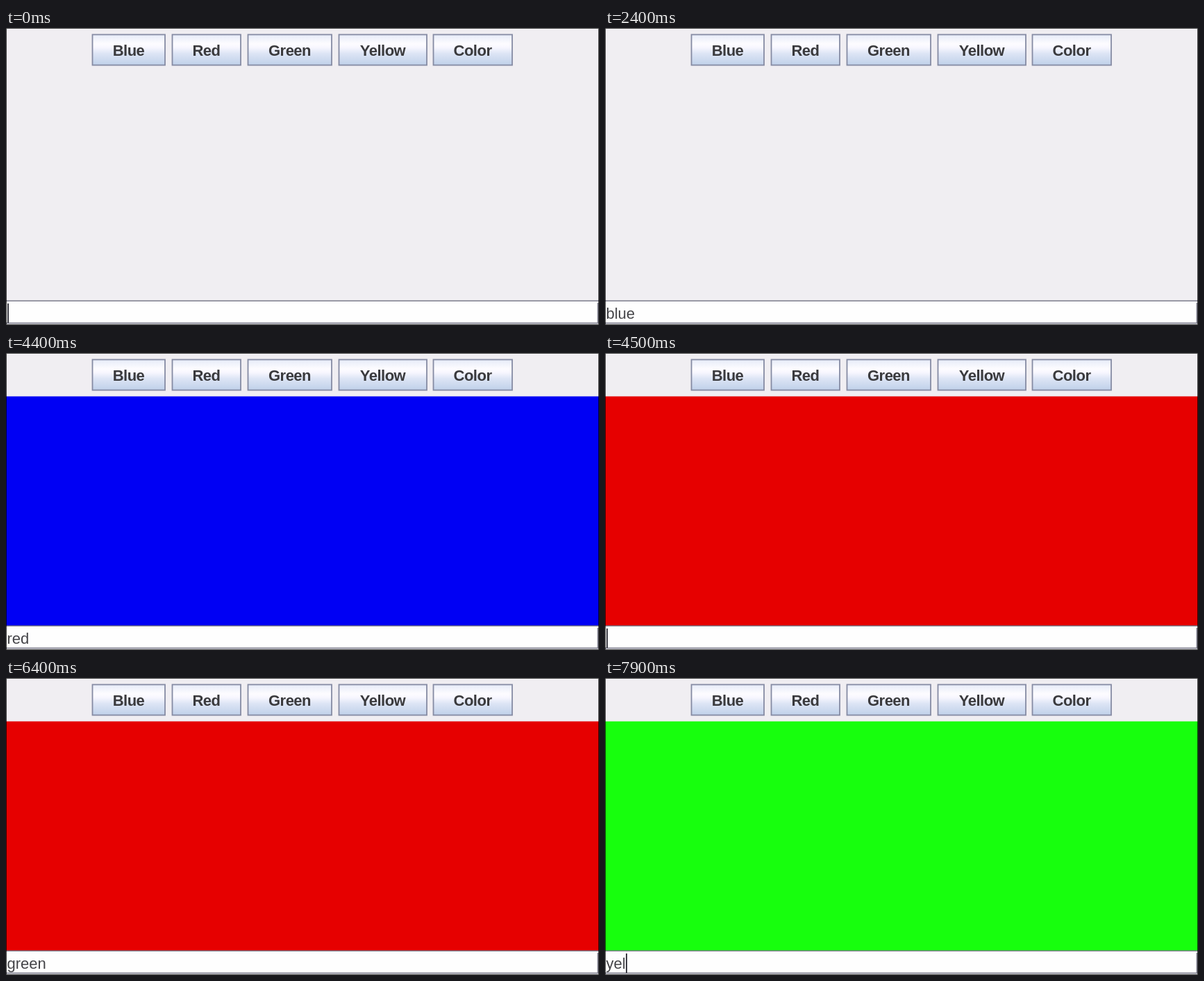
Animation of 854 by 428 pixels, one loop 8000 ms. Source, as an HTML page:

```html
<!DOCTYPE html>
<html lang="en">
<head>
<meta charset="utf-8">
<title>Color panel</title>
<style>
  html, body { margin: 0; width: 100%; height: 100%; overflow: hidden; background: #f0eef2; }
  svg { display: block; width: 854px; height: 428px; }
  text { font-family: "Liberation Sans", Arial, sans-serif; white-space: pre; }
  .label { font-size: 22px; font-weight: bold; letter-spacing: -.5px; fill: #3a3a3d; text-anchor: middle; }
  #typed { font-size: 22px; fill: #444448; }
</style>
</head>
<body>
<svg viewBox="0 0 854 428">
  <defs>
    <linearGradient id="face" x1="0" y1="0" x2="0" y2="1">
      <stop offset="0" stop-color="#e6ebf8"/>
      <stop offset=".3" stop-color="#fdfcff"/>
      <stop offset=".42" stop-color="#f8f7ff"/>
      <stop offset=".62" stop-color="#dde5f5"/>
      <stop offset="1" stop-color="#bfd0e9"/>
    </linearGradient>
  </defs>
  <rect width="854" height="428" fill="#f0eef2"/>
  <g id="buttons"></g>
  <rect id="panel" y="62.5" width="854" height="330.5"/>

  <!-- text field -->
  <rect y="393" width="854" height="35" fill="#fefefe"/>
  <g fill="none" stroke="#7c7c8c" stroke-width="1.6">
    <path d="M0 393.3H854"/>
    <path d="M0 425.4H853"/>
    <path d="M852.4 396V426"/>
  </g>
  <text id="typed" x="1.5" y="419"></text>
  <rect id="caret" y="397" width="2" height="28" fill="#3c3c44"/>

  <rect x=".5" y=".5" width="853" height="427" fill="none" stroke="#000" stroke-opacity=".75"/>
</svg>
<script>
const LOOP = 8000;
const BLUE = "#0000f4", RED = "#e60000", GREEN = "#17ff0d";

// [start ms, field text, caret visible, panel colour]
const steps = [
  [0, "", 1, "none"], [400, "", 0, "none"], [900, "", 1, "none"],
  [1300, "b", 1, "none"], [1600, "bl", 1, "none"],
  [1800, "blu", 1, "none"], [1900, "blue", 1, "none"], [2400, "blue", 0, "none"],
  [2800, "", 1, BLUE], [3300, "", 0, BLUE],
  [3500, "r", 1, BLUE], [3700, "re", 1, BLUE],
  [3900, "red", 1, BLUE], [4400, "red", 0, BLUE],
  [4500, "", 1, RED], [5000, "", 0, RED],
  [5100, "g", 1, RED], [5300, "gr", 1, RED], [5500, "gre", 1, RED],
  [5700, "gree", 1, RED], [5900, "green", 1, RED], [6400, "green", 0, RED],
  [6800, "", 1, GREEN], [7300, "", 0, GREEN],
  [7500, "y", 1, GREEN], [7700, "ye", 1, GREEN], [7900, "yel", 1, GREEN]
];

const buttons = [
  ["Blue", 124, 229], ["Red", 239, 338], ["Green", 348, 469],
  ["Yellow", 479, 606], ["Color", 615, 729]
];

const byId = id => document.getElementById(id);
const panel = byId("panel"), typed = byId("typed"), caret = byId("caret");

byId("buttons").innerHTML = buttons.map(([name, left, right]) => `
  <rect x="${left + .5}" y="9.5" width="${right - left - .5}" height="44"
    fill="url(#face)" stroke="#858ba3" stroke-width="1.8"/>
  <text class="label" x="${(left + right) / 2}" y="40.4">${name}</text>`).join("");

let shown;
function show(step) {
  if (step === shown) return;
  shown = step;
  const [, text, caretOn, color] = step;
  typed.textContent = text;
  const width = text ? typed.getComputedTextLength() : 0;
  caret.setAttribute("x", Math.round(width + 1.5));
  caret.setAttribute("visibility", caretOn ? "visible" : "hidden");
  panel.setAttribute("fill", color);
}

const origin = performance.now();
function tick() {
  const time = (performance.now() - origin) % LOOP;
  show(steps.findLast(step => step[0] <= time));
  requestAnimationFrame(tick);
}
tick();
</script>
</body>
</html>
```
